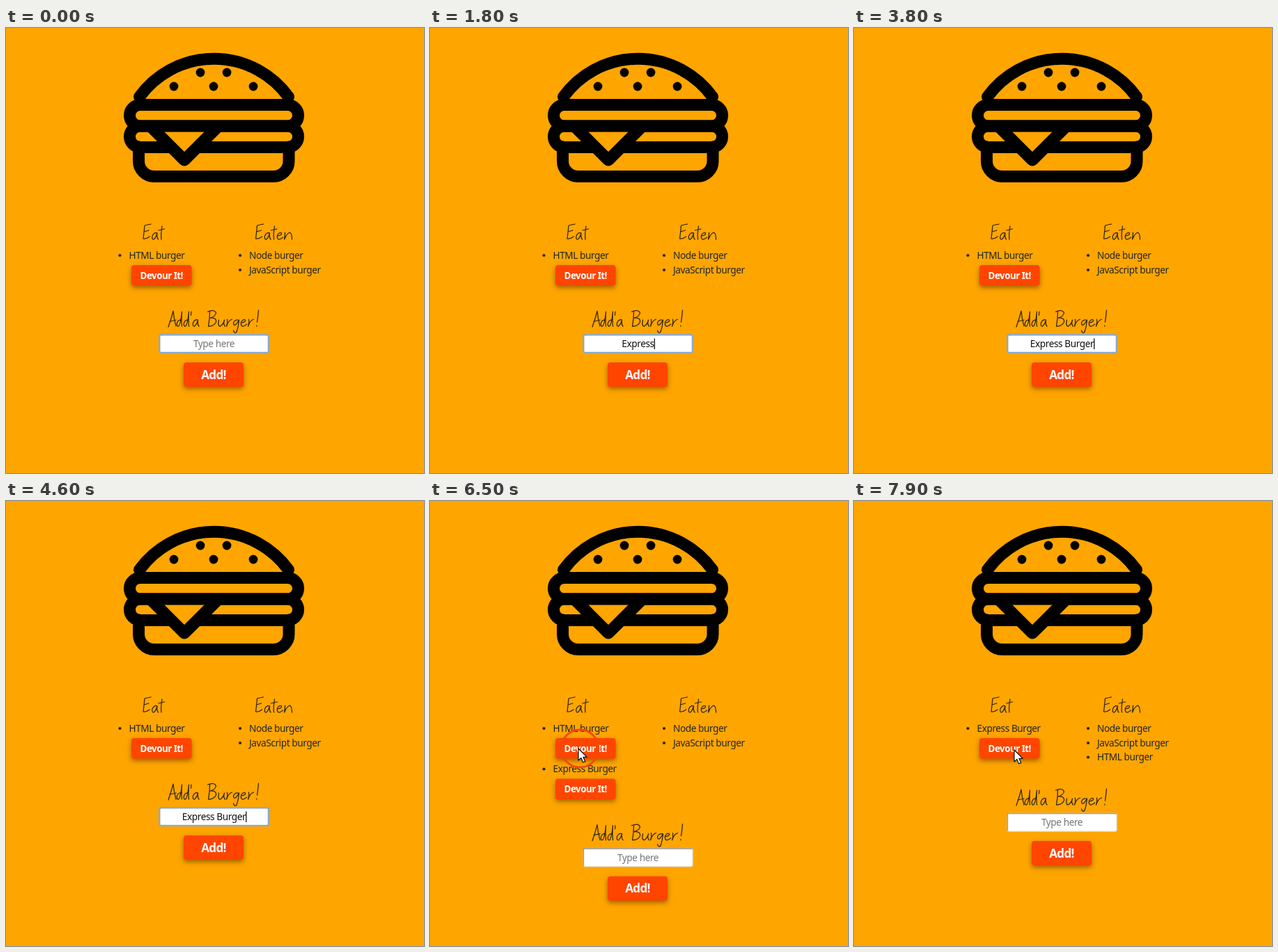
Animation, 600 px wide and 640 px high, one loop 8000 ms. Source, as an HTML page:

```html
<!DOCTYPE html>
<html lang="en">
<head>
<meta charset="utf-8">
<title>Burger list</title>
<style>
  html, body { margin: 0; width: 100%; height: 100%; overflow: hidden; background: #ffa500; }
  svg { display: block; width: 100%; height: 100%; }
  text { font: 500 13.6px "Noto Sans", "Open Sans", sans-serif; letter-spacing: -.03em; fill: #212529; }
  .mid { font-weight: 400; text-anchor: middle; }
  .button rect { fill: #ff4500; filter: drop-shadow(0 3.5px 3.5px rgba(60, 30, 0, .5)); }
  .button text { fill: #fff; font-weight: 700; letter-spacing: -.04em; text-anchor: middle; }
  .hand { fill: none; stroke: #2b2418; stroke-width: 1.25; stroke-linecap: round; stroke-linejoin: round; }
  .line { fill: none; stroke: #000; stroke-width: 17; stroke-linecap: round; stroke-linejoin: round; }
</style>
</head>
<body>
<svg id="stage" viewBox="0 0 600 640" xmlns="http://www.w3.org/2000/svg">
  <rect width="600" height="640" fill="#ffa500"/>
  <g class="line">
    <path d="M191.5 99A132 132 0 0 1 405.5 99"/>
    <path d="M190.5 171V191.5A22 22 0 0 0 212.5 213.5H384A22 22 0 0 0 406 191.5V171"/>
    <rect x="177.5" y="141" width="242" height="30.5" rx="15.2"/>
    <path d="M209 143L256 190L303 143" fill="#ffa500"/>
    <rect x="177.5" y="110.5" width="242" height="30.5" rx="15.2"/>
  </g>
  <g id="seeds"></g>
  <g id="page"></g>
  <g id="form"></g>
  <circle id="ring" cx="215" cy="356" r="27" fill="none" stroke="#f4480f" stroke-width="2.8"/>
  <path id="pointer" d="M0 0V17L3.9 13.4L6.6 19.8L9.6 18.6L6.9 12.3H12.2Z" fill="#fff" stroke="#111" stroke-width="1.2" stroke-linejoin="round"/>
</svg>
<script>
const LOOP = 8000, SUBMIT = 5000, CLICK = 6500, EATEN = 6800;
const $ = id => document.getElementById(id);

function add(parent, tag, attrs = {}, label) {
  const el = document.createElementNS("http://www.w3.org/2000/svg", tag);
  for (const key in attrs) el.setAttribute(key, attrs[key]);
  if (label) el.textContent = label;
  return parent.appendChild(el);
}

// Handwritten letters: [advance, stroke path], baseline at 0
const letters = {
  E: [13, "M12-22Q7-21 3-20Q2-9 1-1Q5 0 10-4M2-11L9-13"],
  a: [10, "M8-9Q4-11 1-5Q0 0 3 0Q6-2 8-9Q7-3 9.5 0"],
  t: [8, "M5-19Q3-8 4 0M0-13L8.5-15"],
  e: [10, "M1-5Q8-6 7-9Q4-11 1-6Q0 0 4 0Q7-1 9-3"],
  n: [13, "M2-10Q2-4 1 0Q5-9 9-10Q12-8 12 0"],
  A: [11.5, "M0 1Q4-10 7-22Q8-11 11 0M2-7L11-9"],
  d: [10, "M7-9Q3-10 1-5Q0 0 3 0Q6-2 8-21Q7-8 8 0"],
  "'": [3, "M1.5-21L1-16"],
  B: [15, "M3-22Q3-10 1 0M0-21Q10-25 12-19Q11-14 3-12Q13-13 12-6Q9 0 1 0"],
  u: [11, "M1-9Q-1 0 3 0Q7-2 9-9Q7-3 10 0"],
  r: [10, "M2-10Q3-5 1 0Q4-9 9-10"],
  g: [11, "M8-9Q3-10 1-5Q1-1 4-2Q7-5 9-9Q8 2 5 9Q2 10 1 6"],
  "!": [7, "M6-23Q5-13 4-6M3.5-1L3.3 0"],
  " ": [12, ""]
};

function handwrite(parent, word, x, y) {
  const g = add(parent, "g", { class: "hand", role: "img", "aria-label": word });
  for (const c of word) {
    const [advance, d] = letters[c];
    add(g, "path", { d, transform: `translate(${x} ${y})` });
    x += advance;
  }
}

function bullet(parent, x, y, label) {
  add(parent, "circle", { cx: x - 13, cy: y - 4.5, r: 2.1, fill: "#212529" });
  return add(parent, "text", { x, y }, label);
}

function button(parent, x, y, w, h, label, size) {
  const g = add(parent, "g", { class: "button" });
  add(g, "rect", { x, y, width: w, height: h, rx: 4 });
  add(g, "text", { x: x + w / 2, y: y + h / 2 + size * .36, style: `font-size:${size}px` }, label);
}

const show = (el, on) => el.setAttribute("visibility", on ? "visible" : "hidden");
const move = (el, x, y) => el.setAttribute("transform", `translate(${x} ${y})`);

for (const [cx, cy] of [[279, 64], [317, 64], [241, 84], [298, 84], [355, 84]])
  add($("seeds"), "circle", { cx, cy, r: 6.4 });

const page = $("page"), form = $("form");
handwrite(page, "Eat", 196, 304);
handwrite(page, "Eaten", 357.5, 304);
const first = bullet(page, 176.5, 331.5, "HTML burger");
button(page, 180, 341, 86.5, 29.5, "Devour It!", 13.4);
const second = add(page, "g");
bullet(second, 176.5, 390, "Express Burger");
button(second, 180, 399.5, 86.5, 29.5, "Devour It!", 13.4);
bullet(page, 349, 331.5, "Node burger");
bullet(page, 349, 352.5, "JavaScript burger");
const third = add(page, "g");
bullet(third, 349, 373, "HTML burger");

handwrite(form, "Add'a Burger!", 233, 429);
const field = add(form, "rect", { x: 220.3, y: 441.3, width: 156.6, height: 25.6, rx: 2.5, fill: "#fff" });
const bevel = add(form, "path", { d: "M220.4 466V441.4H376.5", fill: "none", stroke: "#9c9a94", "stroke-width": 1.5 });
const entry = add(form, "text", { x: 298.5, y: 459, class: "mid" });
const caret = add(form, "rect", { y: 446.5, width: 1.2, height: 15.5 });
button(form, 255, 481, 86, 35, "Add!", 17);

// Time at which each prefix of the new name has been typed
const typed = [[800, 1], [1000, 2], [1200, 3], [1400, 4], [1500, 5], [1600, 6], [1800, 7],
  [2600, 9], [2800, 10], [2900, 11], [3100, 12], [3200, 13], [3400, 14]];
// Pointer stops: time, x, y
const stops = [[5100, 268, 452], [5300, 241, 416], [5450, 241, 416], [6100, 213, 356],
  [6850, 213, 356], [7400, 230, 358], [LOOP, 230, 358]];

function pointerAt(t) {
  const i = Math.max(1, stops.findIndex(s => s[0] > t));
  const [t0, x0, y0] = stops[i - 1], [t1, x1, y1] = stops[i];
  const p = Math.min(1, Math.max(0, (t - t0) / (t1 - t0))), k = p * p * (3 - 2 * p);
  return [x0 + (x1 - x0) * k, y0 + (y1 - y0) * k];
}

function draw(t) {
  const focused = t < SUBMIT, eaten = t >= EATEN;
  const count = typed.reduce((n, [at, len]) => t >= at ? len : n, 0);
  const value = focused ? "Express Burger".slice(0, count) : "";

  first.textContent = eaten ? "Express Burger" : "HTML burger";
  show(second, !focused && !eaten);
  show(third, eaten);
  move(form, 0, focused ? 0 : eaten ? 8 : 58.7);

  field.setAttribute("stroke", focused ? "#8fa9c4" : "#e6e2da");
  field.setAttribute("stroke-width", focused ? 2.4 : 1.5);
  show(bevel, !focused);
  entry.textContent = value || "Type here";
  entry.style.fill = value ? "#111" : "#757575";
  show(caret, value);
  if (value) caret.setAttribute("x", 298.5 + entry.getComputedTextLength() / 2);

  const age = t - CLICK;
  show($("ring"), age >= 0 && age < 300);
  $("ring").setAttribute("opacity", Math.min(1, Math.max(0, 1 - (age - 100) / 200)));
  show($("pointer"), t >= stops[0][0]);
  move($("pointer"), ...pointerAt(t));
}

const start = performance.now();
function tick() {
  draw((performance.now() - start) % LOOP);
  requestAnimationFrame(tick);
}
tick();
</script>
</body>
</html>
```
